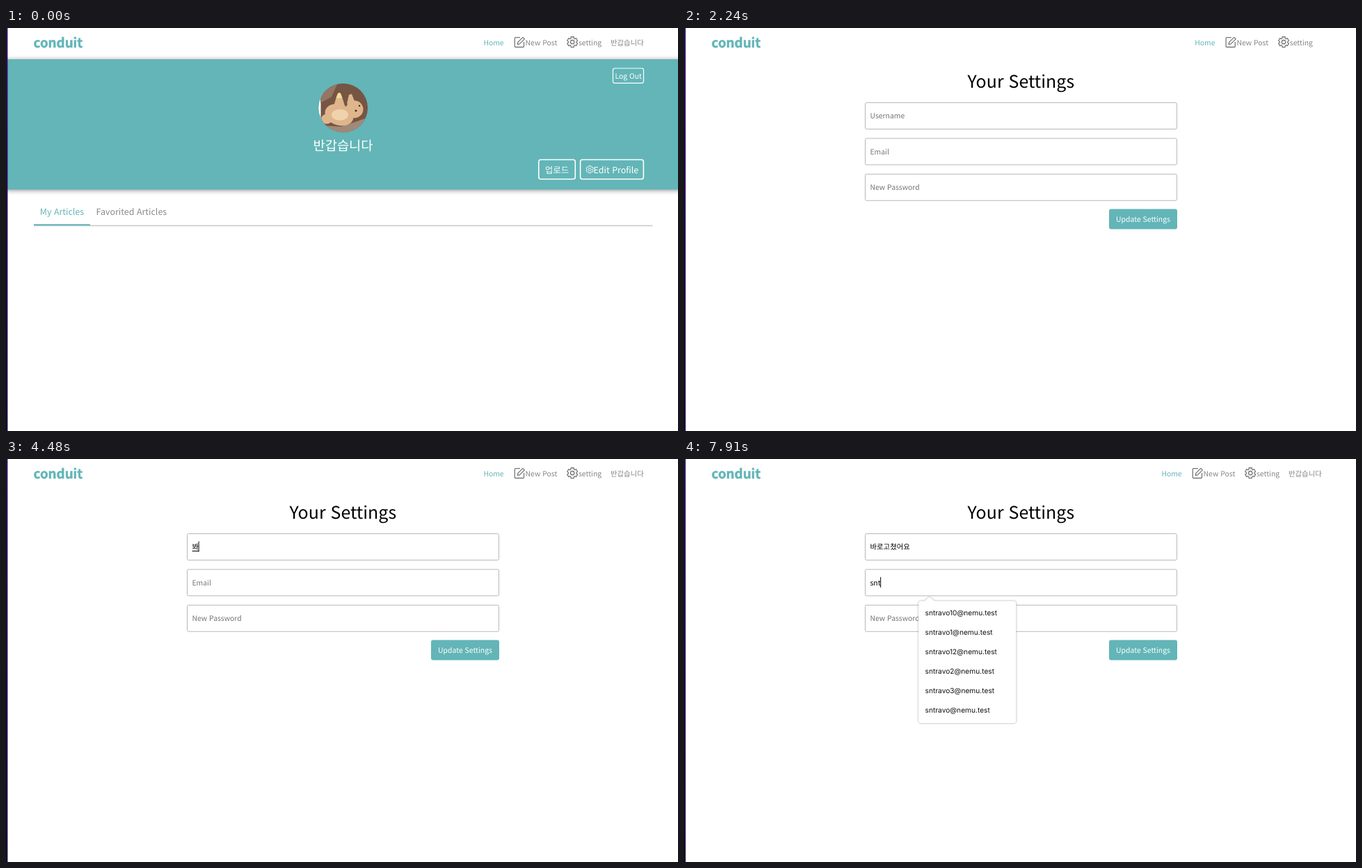
Recreate the animation shown at these times as an HTML page. Size 966 by 580 pixels, loop 8 s.

```html
<!DOCTYPE html>
<html lang="ko">
<head>
<meta charset="utf-8">
<title>Profile settings</title>
<style>
  html, body { margin: 0; width: 100%; height: 100%; overflow: hidden; background: #fff; }
  svg { display: block; width: 966px; height: 580px; }
  text { font: 10.4px "Noto Sans CJK KR", "Noto Sans CJK JP", "Noto Sans CJK", sans-serif; text-rendering: geometricPrecision; }
  .teal { fill: #63b5b7; }
  .logo { font-size: 18.72px; font-weight: 700; stroke: #63b5b7; stroke-width: .5; }
  .nav { fill: #858585; font-weight: 500; }
  .nav .teal { fill: #63b5b7; }
  .icon { fill: none; stroke: #777; stroke-width: 1.3; stroke-linejoin: round; }
  .banner { fill: #63b5b7; filter: drop-shadow(0 1px 3.5px rgba(0, 0, 0, .45)); }
  .white { fill: #fff; font-weight: 500; }
  .name { font-size: 18.72px; }
  .mid { font-size: 12.48px; }
  .outline { fill: none; stroke: #fff; stroke-width: 1.6; }
  #edit { --ink: #fff; }
  #edit.hover { --ink: #479b9e; }
  #edit text { fill: var(--ink); }
  #edit .outline, #edit .icon { stroke: var(--ink); }
  .title { font-size: 24.96px; }
  .field { fill: #fff; stroke: #b8b8b8; }
  .hint { fill: #757575; }
  .menu path { fill: #fff; filter: drop-shadow(0 .5px 1.2px rgba(0, 0, 0, .42)); }
  .menu text { font: 10.2px Inter, sans-serif; fill: #111; }
</style>
</head>
<body>
<svg viewBox="0 0 966 580">
  <defs>
    <path id="gear"/>
    <clipPath id="round"><circle cx="484.7" cy="115" r="35.3"/></clipPath>
    <linearGradient id="edge" x2="0" y2="1">
      <stop stop-color="#2d1257"/><stop offset=".5" stop-color="#220a4a"/><stop offset="1" stop-color="#1a0a36"/>
    </linearGradient>
  </defs>

  <g id="profile">
    <rect class="banner" x="0" y="45" width="970" height="187.5"/>
    <g clip-path="url(#round)">
      <path fill="#fff" d="M449 79h4v72h-4z"/>
      <path fill="#765544" d="M452.5 79h68v72h-68z"/>
      <path fill="#947662" d="M452 79h25l-9 20-16 9z"/>
      <path fill="#a08a77" d="M452 140l30 2 38-13v22h-68z"/>
      <g fill="#dfb68c">
        <ellipse cx="479" cy="125" rx="21" ry="15" transform="rotate(18 479 125)"/>
        <circle cx="501" cy="117" r="12.5"/>
        <path d="M470 116l5-17q4-7 8 0l5 16zM490 109l3-13 4-1 5 13z"/>
        <ellipse cx="461" cy="131" rx="8" ry="7"/>
      </g>
      <ellipse cx="480" cy="125" rx="12" ry="8" fill="#f0d2ad"/>
      <path fill="#f3dc94" d="M475 101q1-8 4-8t4 8z"/>
      <circle cx="503" cy="119" r="1.6" fill="#493326"/>
      <circle cx="508" cy="112" r="1.3" fill="#493326"/>
    </g>
    <text class="white name" x="484.5" y="176" text-anchor="middle">반갑습니다</text>
    <rect class="outline" x="872.5" y="58" width="44" height="21.3" rx="2.5" style="stroke-width:1.2"/>
    <text class="white" x="894.7" y="72.6" text-anchor="middle">Log Out</text>
    <rect class="outline" x="765.8" y="189.5" width="52.5" height="28" rx="3"/>
    <text class="white mid" x="792" y="208.5" text-anchor="middle">업로드</text>
    <g id="edit">
      <rect class="outline" x="825.6" y="189.5" width="90.8" height="28" rx="3"/>
      <use class="icon" href="#gear" transform="translate(839.2 203.6) scale(.7)"/>
      <text class="white mid" x="844.6" y="208.5">Edit Profile</text>
    </g>
    <path fill="#c8c8c8" d="M40 283.7h889.5v1.6H40z"/>
    <path class="teal" d="M40 282.3h81v2H40z"/>
    <text class="teal mid" x="48.8" y="269">My Articles</text>
    <text class="mid" x="129.6" y="269" fill="#8a8a8a">Favorited Articles</text>
  </g>

  <g id="settings">
    <text class="title" x="484.3" y="86" text-anchor="middle">Your Settings</text>
    <g id="fields"></g>
    <rect class="teal" x="611" y="260.5" width="98" height="29" rx="3"/>
    <text class="white" x="660" y="279" text-anchor="middle">Update Settings</text>
    <path id="underline" stroke="#000"/>
    <path id="caret" stroke="#000"/>
    <g id="menus"></g>
  </g>

  <text class="teal logo" x="39.6" y="28">conduit</text>
  <g class="nav">
    <g id="links">
      <text class="teal" x="686.4" y="24.8">Home</text>
      <path class="icon" d="M739 13.7h-6.4q-1.3 0-1.3 1.3v11.2q0 1.3 1.3 1.3h10.6q1.3 0 1.3-1.3V20M735.3 23.6l.6-3.2 7-7 2.5 2.5-7 7z"/>
      <text x="746.6" y="24.8">New Post</text>
      <use class="icon" href="#gear" transform="translate(814.2 20.2)"/>
      <text x="823" y="24.8">setting</text>
    </g>
    <text id="user" x="869" y="24.8">반갑습니다</text>
  </g>
  <rect width="2.4" height="580" fill="url(#edge)"/>
</svg>

<script>
const $ = id => document.getElementById(id);
const LOOP = 8000, LEFT = 267.5;

const polar = (r, deg) => {
  const a = deg * Math.PI / 180;
  return [r * Math.sin(a), -r * Math.cos(a)].map(v => v.toFixed(2)).join(' ');
};
let teeth = [];
for (let a = 0; a < 360; a += 60)
  teeth.push(polar(5.8, a - 23), polar(7.7, a - 15), polar(7.7, a + 15), polar(5.8, a + 23));
$('gear').setAttribute('d', `M${teeth.join('L')}ZM2.7 0A2.7 2.7 0 1 0 -2.7 0A2.7 2.7 0 1 0 2.7 0Z`);

const hints = ['Username', 'Email', 'New Password'];
const fieldTop = i => 107.5 + 51.4 * i;
$('fields').innerHTML = hints.map((hint, i) =>
  `<rect class="field" x="260.5" y="${fieldTop(i)}" width="448" height="38" rx="2"/>
   <text x="${LEFT}" y="${fieldTop(i) + 22.6}">${hint}</text>`).join('');
const inputs = [...$('fields').querySelectorAll('text')];

// Suggestion list with a small pointer on its top edge
const menu = (top, width, rows) => `<g class="menu">
  <path d="M341 ${top}h5l5.6-5q1.4-1.2 2.8 0l5.6 5h${width - 27}q4 0 4 4v168q0 4-4 4h-${width - 8}q-4 0-4-4v-168q0-4 4-4z"/>
  ${rows.map((row, i) => `<text x="346.5" y="${top + 21.2 + 28 * i}">${row}</text>`).join('')}</g>`;
const mails = ['10', '1', '12', '2', '3', ''].map(n => `sntravo${n}@nemu.test`);
$('menus').innerHTML =
  menu(152.6, 66, ['12', '1', '123', '111', '123456', '12345']) + menu(204.2, 140.5, mails);
const [nameMenu, mailMenu] = $('menus').children;

const nameKeys = [
  [0, ''], [4060, 'ㅂ'], [4200, ''], [4410, 'ㅂ'], [4480, '봐'], [4830, '바'], [4900, '발'],
  [4970, '바로'], [5110, '바록'], [5180, '바로ㄱ'], [5460, '바로고'], [5600, '바로곷'],
  [5670, '바로고ㅊ'], [5740, '바로고쳐'], [5880, '바로고쳤ㅇ'], [5950, '바로고쳤어'],
  [6090, '바로고쳤엉'], [6230, '바로고쳤어요']
];
const mailKeys = [[0, ''], [7700, 's'], [7770, 'sn'], [7910, 'snt']];
const typedAt = (keys, t) => keys.filter(([at]) => at <= t).pop()[1];
const show = (el, on) => el.style.display = on ? '' : 'none';
const within = (t, from, to) => t >= from && t < to;

function fill(i, value) {
  const text = value || hints[i];
  if (inputs[i].textContent !== text) inputs[i].textContent = text;
  inputs[i].setAttribute('class', value ? '' : 'hint');
  return value ? inputs[i].getComputedTextLength() : 0;
}

function draw(t) {
  const onSettings = t >= 2240, signedIn = !within(t, 2240, 2590);
  show($('profile'), !onSettings);
  show($('settings'), onSettings);
  $('edit').classList.toggle('hover', t >= 1400);
  show($('user'), signedIn);
  $('links').setAttribute('transform', `translate(${signedIn ? 0 : 47.8})`);

  const name = typedAt(nameKeys, t);
  const widths = [fill(0, name), fill(1, typedAt(mailKeys, t)), fill(2, '')];
  const active = t < 6580 ? 0 : 1;
  const x = LEFT + widths[active], y = fieldTop(active) + 11;
  $('caret').setAttribute('d', `M${x} ${y}v15`);
  show($('caret'), t >= 3220 && !within(t, 3780, 4060) && !within(t, 7140, 7700));
  $('underline').setAttribute('d', `M${x - 9.5} 132.5H${x}`);
  show($('underline'), name && active === 0);
  show(nameMenu, within(t, 3290, 4060));
  show(mailMenu, t >= 7770);
}

function tick() {
  draw(performance.now() % LOOP);
  requestAnimationFrame(tick);
}
tick();
</script>
</body>
</html>
```
